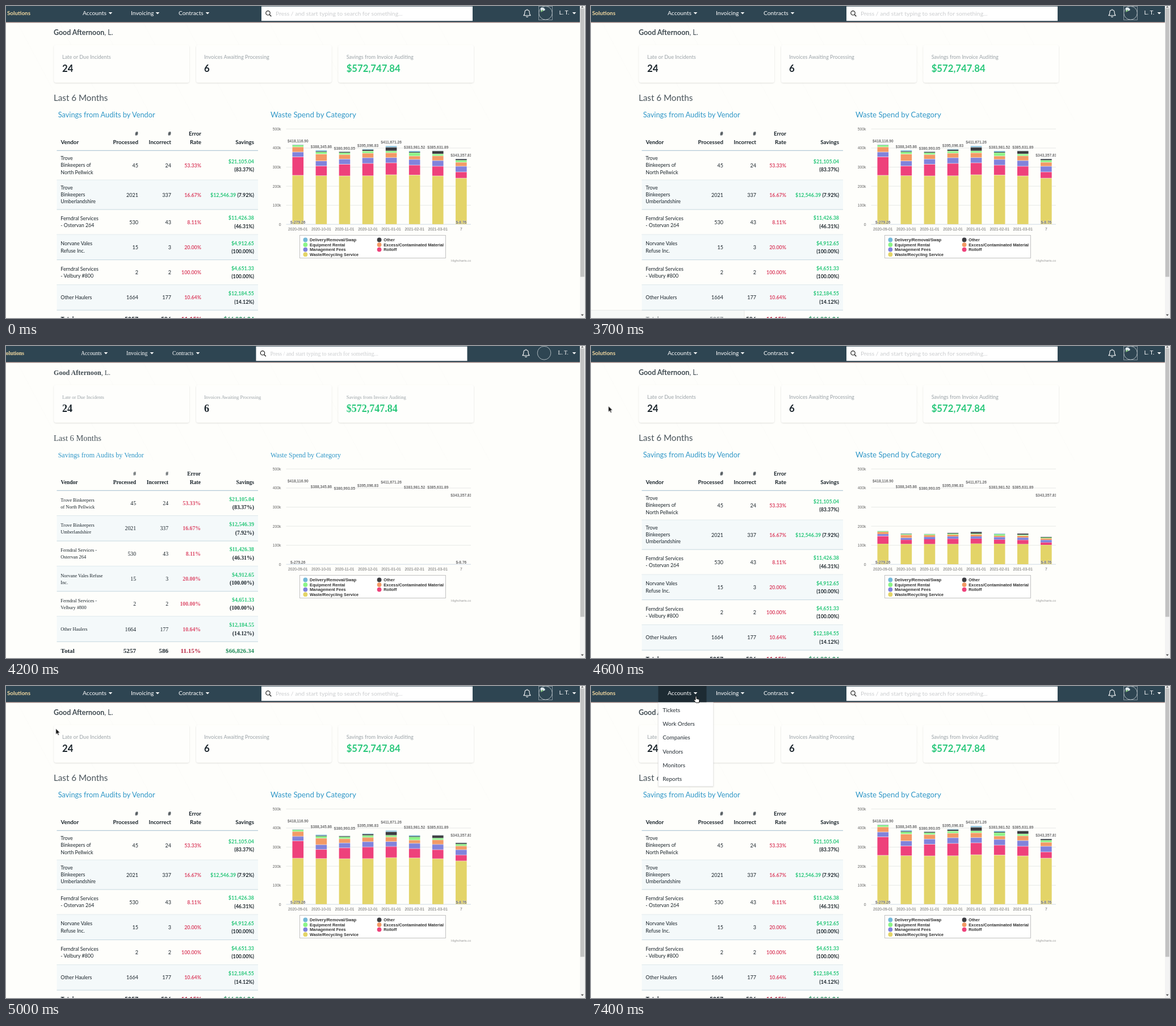
Recreate the animation shown at these times as an HTML page. Size 1020 px wide and 549 px high, loop 8000 ms.

```html
<!DOCTYPE html>
<html lang="en">
<head>
<meta charset="utf-8">
<title>Savings dashboard</title>
<style>
html, body { margin: 0; width: 100%; height: 100%; overflow: hidden; background: #fefefb; }
svg { display: block; width: 1020px; height: 549px; }
text { white-space: pre; }
.sans { font-family: Lato, sans-serif; }
.serif { font-family: "Liberation Serif", serif; }
.chart { font-family: "Liberation Sans", Arial, sans-serif; }
.frame, .sans, .serif, .status, .bars, .cursor, .arrow, .hand, .menu { animation: 8s step-end infinite; }
.frame { animation-name: reload; }
.sans { animation-name: loaded; }
.serif { animation-name: fallback; }
.status { animation-name: status; }
.bars { animation-name: grow; transform-origin: 0 384.2px; }
.cursor { animation-name: move; }
.arrow { animation-name: arrow; }
.hand { animation-name: hand; }
.menu { animation-name: menu; }
@keyframes reload { 0%, 52.5% { opacity: 1 } 48.75% { opacity: 0 } }
@keyframes loaded { 0%, 55% { opacity: 1 } 48.75% { opacity: 0 } }
@keyframes fallback { 0%, 55% { opacity: 0 } 52.5% { opacity: 1 } }
@keyframes status { 0%, 47.5% { opacity: 0 } 6.25% { opacity: 1 } 46.25% { opacity: .55 } }
@keyframes menu { 0% { opacity: 0 } 91.25% { opacity: .5 } 92.5%, 100% { opacity: 1 } }
@keyframes arrow { 0%, 71.25% { opacity: 0 } 56.25% { opacity: 1 } }
@keyframes hand { 0% { opacity: 0 } 71.25%, 100% { opacity: 1 } }
@keyframes grow {
  0%, 63.75% { transform: none }
  48.75% { transform: scaleY(.004) }
  55% { transform: scaleY(.147) }
  56.25% { transform: scaleY(.273) }
  57.5% { transform: scaleY(.419) }
  58.75% { transform: scaleY(.576) }
  60% { transform: scaleY(.725) }
  61.25% { transform: scaleY(.851) }
  62.5% { transform: scaleY(.941) }
}
@keyframes move {
  0% { transform: translate(12px, 116px) }
  57.5% { transform: translate(30.6px, 105.6px) }
  58.75% { transform: translate(45px, 99px) }
  60% { transform: translate(58px, 92px) }
  61.25% { transform: translate(72px, 85px) }
  62.5% { transform: translate(87.7px, 74.8px) }
  63.75% { transform: translate(116px, 47px) }
  68.75% { transform: translate(126px, 40px) }
  70% { transform: translate(143px, 31px) }
  71.25% { transform: translate(164px, 20px) }
  72.5% { transform: translate(179px, 14px) }
  73.75% { transform: translate(184px, 15px) }
  75%, 100% { transform: translate(185px, 18px) }
}
</style>
</head>
<body>
<svg id="stage" viewBox="0 0 1020 549"></svg>
<script>
const INK = '#1b252c', GREEN = '#28c77a', PINK = '#dc4867', BLUE = '#2f97c8', BAR = '#2e4552';

const esc = s => s.replace(/&/g, '&amp;').replace(/</g, '&lt;');
const text = (x, y, s, size, fill = INK, weight = 400, anchor = 'start') =>
  `<text x="${x}" y="${y}" font-size="${size}" fill="${fill}" font-weight="${weight}" text-anchor="${anchor}">${esc(s)}</text>`;
const rect = (x, y, w, h, fill, extra = '') =>
  `<rect x="${x}" y="${y}" width="${w}" height="${h}" fill="${fill}" ${extra}/>`;
const path = (d, fill = 'none', extra = '') => `<path d="${d}" fill="${fill}" ${extra}/>`;
const rule = (x1, x2, y, color, width = 1) => path(`M${x1} ${y}H${x2}`, 'none', `stroke="${color}" stroke-width="${width}"`);
const group = (cls, body) => `<g class="${cls}">${body}</g>`;
const caret = x => path(`M${x - 3.3} 11h6.6l-3.3 3.6z`, '#fff');

// vendor lines (web font), vendor lines (fallback), processed, incorrect, rate, savings, share
const rows = [
  ['Trove|Binkeepers of|North Pellwick', 'Trove Binkeepers|of North Pellwick', '45', '24', '53.33%', '$21,105.04', '(83.37%)'],
  ['Trove|Binkeepers|Umberlandshire', 'Trove Binkeepers|Umberlandshire', '2021', '337', '16.67%', '$12,546.39', '(7.92%)'],
  ['Ferndral Services|- Ostervan 264', 'Ferndral Services -|Ostervan 264', '530', '43', '8.11%', '$11,426.38', '(46.31%)'],
  ['Norvane Vales|Refuse Inc.', 'Norvane Vales Refuse|Inc.', '15', '3', '20.00%', '$4,912.65', '(100.00%)'],
  ['Ferndral Services|- Velbury #800', 'Ferndral Services -|Velbury #800', '2', '2', '100.00%', '$4,651.33', '(100.00%)'],
  ['Other Haulers', 'Other Haulers', '1664', '177', '10.64%', '$12,184.55', '(14.12%)']
];

const sans = {
  cls: 'sans', vendor: 0, nav: [135, 220, 304], carets: [184, 267, 355], search: 450, bell: 918, avatar: 950.5, user: 974.5,
  brand: [43, 9.9], navSize: 10.3, hint: 10.4, hello: 12.4, label: 9.15, figure: 16.7, period: 15.2, titles: [12.8, 13.3],
  head: 9.8, cols: [233, 291, 344], name: 8.9, num: 9, strong: 8.85, total: 10.5,
  edges: [254.5, 306.3, 358.1, 402.3, 446.6, 490.8, 535.2]
};
const serif = {
  cls: 'serif', vendor: 1, nav: [132, 212, 293], carets: [176, 257, 338], search: 440.5, bell: 916, avatar: 948, user: 972.5,
  brand: [32, 9.5], navSize: 9.75, hint: 9.75, hello: 12.1, label: 8.5, figure: 18, period: 14.5, titles: [12, 12],
  head: 9.6, cols: [229, 286, 343], name: 8.4, num: 9.75, strong: 9.75, total: 11.1,
  edges: [0, 1, 2, 3, 4, 5, 6].map(i => 254.5 + i * 44.3)
};

function header(f) {
  const s = f.search, b = f.bell, a = f.avatar;
  const icon = `stroke="#fff" stroke-width="1.1" stroke-linejoin="round"`;
  let out = text(f.brand[0], 16.3, 'Solutions', f.brand[1], '#f3d9a0', 700, 'end');
  ['Accounts', 'Invoicing', 'Contracts'].forEach((name, i) => out += text(f.nav[i], 15.6, name, f.navSize, '#fff') + caret(f.carets[i]));
  out += rect(s, .8, 372, 25.4, '#fff') +
    `<circle cx="${s + 11.5}" cy="12.3" r="3.7" fill="none" stroke="#222" stroke-width="1.2"/>` +
    path(`M${s + 14.3} 15.2l3 3`, 'none', 'stroke="#222" stroke-width="1.4"') +
    text(s + 25, 16.7, 'Press / and start typing to search for something...', f.hint, '#cbcdcf');
  out += path(`M${b - 6} 16.7c2-2 1.8-3.7 1.9-5.7c.2-5.3 8-5.3 8.2 0c.1 2 0 3.7 1.9 5.7zM${b} 7v-1.5M${b - 1.6} 18.2c.4 1.7 2.8 1.7 3.2 0`, 'none', icon);
  out += `<circle cx="${a}" cy="12.3" r="11.8" fill="none" stroke="#b9c3c8" stroke-width=".9"/>`;
  if (f === sans) out += rect(938.5, .5, 24, 24, 'none', 'stroke="#9eabb2" stroke-width=".8"') +
    path('M942 3h5l2.5 2.5v2l-7.5 3z', '#dfe9ef') + path('M942 9l3-2.5 2 1.5-5 3z', '#6fb56b');
  return out + text(f.user, 15.4, 'L. T.', f.navSize - .1, '#fff') + caret(1001);
}

function table(f) {
  const [p, n, r] = f.cols, right = 437;
  let out = '';
  [['#', 'Processed', p], ['#', 'Incorrect', n], ['Error', 'Rate', r], ['', 'Savings', right]].forEach(([a, b, x]) =>
    out += text(x, 228, a, f.head, INK, 700, 'end') + text(x, 242.5, b, f.head, INK, 700, 'end'));
  out += text(96.5, 242.5, 'Vendor', f.head, INK, 700);
  rows.forEach((row, i) => {
    const top = f.edges[i], bottom = f.edges[i + 1], mid = (top + bottom) / 2, lines = row[f.vendor].split('|');
    if (i % 2) out += rect(89.5, top, 354.5, bottom - top, '#f4f9fa');
    out += rule(89.5, 444, bottom, '#c5d7df');
    lines.forEach((s, k) => out += text(96.3, mid + 3 + (k - (lines.length - 1) / 2) * 12.1, s, f.name));
    out += text(p, mid + 3.4, row[2], f.num, INK, 400, 'end') + text(n, mid + 3.4, row[3], f.num, INK, 400, 'end') +
      text(r, mid + 3.4, row[4], f.strong, PINK, 700, 'end');
    if (f === sans && i === 1)
      out += `<text x="${right}" y="${mid + 3.4}" font-size="${f.strong}" font-weight="700" text-anchor="end" fill="${INK}"><tspan fill="${GREEN}">${row[5]}</tspan> ${row[6]}</text>`;
    else out += text(right, mid - 3.9, row[5], f.strong, GREEN, 700, 'end') + text(right, mid + 10.6, row[6], f.strong, INK, 700, 'end');
  });
  const y = f.edges[6] + 19.8;
  out += rule(89.5, 444, 254.3, '#b4c9d8', 1.3) + text(96.5, y, 'Total', f.total, INK, 700);
  [[p, '5257', INK], [n, '586', INK], [r, '11.15%', '#b7213f'], [right, '$66,826.34', '#1e8c58']].forEach(([x, s, c]) =>
    out += text(x, y, s, f.total, c, 700, 'end'));
  return out;
}

function page(f) {
  const gray = '#9ba3a8';
  return group(f.cls, header(f) +
    `<text x="84" y="50.5" font-size="${f.hello}" fill="#3e4950"><tspan font-weight="700">Good Afternoon</tspan>, L.</text>` +
    text(99, 93, 'Late or Due Incidents', f.label, gray) + text(99, 115.7, '24', f.figure, INK, 700) +
    text(349, 93, 'Invoices Awaiting Processing', f.label, gray) + text(349, 115.7, '6', f.figure, INK, 700) +
    text(599.7, 93, 'Savings from Invoice Auditing', f.label, gray) + text(599.7, 115.7, '$572,747.84', f.figure, GREEN, 700) +
    text(84, 166.7, 'Last 6 Months', f.period, '#49545b') +
    text(91.7, 196.2, 'Savings from Audits by Vendor', f.titles[0], BLUE) +
    text(466, 196.2, 'Waste Spend by Category', f.titles[1], BLUE) + table(f));
}

function backdrop() {
  let out = '';
  for (let x = 20; x < 820; x += 74) out += path(`M${x} 30l92 172`, 'none', 'stroke="#fbfbf8"');
  [84.5, 335, 585.5].forEach(x => out += rect(x, 68.5, 238.5, 66.3, '#fefefc', 'rx="4" filter="url(#soft)"'));
  out += rect(0, 0, 1011, 28.7, BAR) + rule(0, 1011, 29.1, '#c08d85', .9);
  out += rect(1011, 0, 9, 549, '#f3f3f3') + rect(1011.8, 4, 7, 472.5, '#c2c2c2') +
    path('M1012.8 3h5l-2.5-3z', '#777') + path('M1012.8 542.5h5l-2.5 3z', '#555');
  return out;
}

// segment tops of each stack, bottom to top, in pixels
const stacks = [
  [298, 265.5, 257, 248, 244.7, 244.4, 244],
  [298.7, 281.5, 272.7, 260.5, 256.7, 255.6, 254],
  [299, 278.5, 269.3, 261.5, 258, 256.7, 256.4],
  [298.8, 277, 267, 259, 255.2, 252.6, 251.8],
  [297, 276, 266.8, 258.3, 255, 248.5, 246.2],
  [297.5, 280, 270, 264, 258, 256.8, 255.2],
  [299, 282, 272, 263.7, 260.3, 255, 254.8],
  [303, 292, 282, 275, 271.2, 269.2, 269]
];
const colors = ['#e3d468', '#ee417b', '#8083dc', '#f39a65', '#8cf587', '#3c3c40', '#74b8d8'];
const totals = ['$418,116.90', '$388,345.86', '$380,993.05', '$395,096.83', '$411,671.26', '$383,981.52', '$385,631.89', '$343,357.81'];
const labelY = [239.8, 250.3, 252.5, 247.8, 242.4, 251.4, 251, 264.8];
const dates = ['2020-09-01', '2020-10-01', '2020-11-01', '2020-12-01', '2021-01-01', '2021-02-01', '2021-03-01', '7'];
const legend = [['Delivery/Removal/Swap', 6], ['Equipment Rental', 4], ['Management Fees', 2], ['Waste/Recycling Service', 0],
  ['Other', 5], ['Excess/Contaminated Material', 3], ['Rolloff', 1]];

function chart() {
  const center = i => 514.3 + i * 41.08;
  let out = '', bars = '', labels = '';
  for (let i = 0; i < 6; i++) {
    const y = 216.4 + i * 33.56;
    out += rule(493.5, 819, y, i < 5 ? '#e5e7e5' : '#cbd5e2', .9) + text(484.5, y + 2.5, i < 5 ? `${500 - i * 100}k` : '0', 6.75, '#666', 400, 'end');
  }
  stacks.forEach((tops, i) => {
    let base = 384.2;
    bars += rect(center(i) - 9.8, tops[6], 19.6, base - tops[6], '#fff');
    tops.forEach((top, k) => {
      const gap = base - top > 2 ? .6 : 0;
      bars += rect(center(i) - 9.8, top + gap / 2, 19.6, base - top - gap, colors[k]);
      base = top;
    });
    labels += text(center(i), labelY[i], totals[i], 6.7, '#6e6e6e', 700, 'middle');
    out += text(center(i), 395.4, dates[i], 6.75, '#666', 400, 'middle');
  });
  labels += text(center(0), 383, '$-279.26', 6.7, '#6e6e6e', 700, 'middle') + text(center(7), 383, '$-8.76', 6.7, '#6e6e6e', 700, 'middle');
  out += group('bars', bars) + `<g paint-order="stroke" stroke="#fff" stroke-opacity=".6" stroke-width="1">${labels}</g>`;
  out += rect(517.5, 403.5, 257, 40, '#fff', 'stroke="#bcbcbc" stroke-width=".9"');
  legend.forEach(([name, c], i) => {
    const x = i < 4 ? 527.4 : 657.6, y = 411.5 + i % 4 * 8.55;
    out += `<circle cx="${x}" cy="${y}" r="3.9" fill="${colors[c]}"/>` + text(x + 7.6, y + 2.7, name, 7.33, '#303030', 700);
  });
  out += text(784, 450.2, 'Highcharts.com', 5.8, '#999');
  return `<g class="chart" clip-path="url(#plot)">${out}</g>`;
}

function menu() {
  const items = ['Tickets', 'Work Orders', 'Companies', 'Vendors', 'Monitors', 'Reports'];
  return group('menu', rect(118.5, 29, 97, 147.5, '#fff', 'filter="url(#soft)" stroke="#dedede" stroke-width=".6"') +
    `<g font-family="Lato, sans-serif">${items.map((s, i) => text(126.3, 45.8 + i * 24.25, s, 9.95, '#242d34')).join('')}</g>`);
}

const cursor = group('cursor',
  group('arrow', path('M0 0V10.5l2.4-2.2 1.6 3.7 1.8-.8-1.6-3.6h3.3z', '#111', 'stroke="#fff" stroke-width=".7"')) +
  group('hand', path('M-1 1c0-1.5 2-1.5 2 0v3.5l4 .9q1 .3 .9 1.5l-.6 4.6h-5.5l-3-4c-.8-1.2 .6-2 1.5-1.2l.7 .7z', '#fff', 'stroke="#111" stroke-width=".9" stroke-linejoin="round"')));

document.getElementById('stage').innerHTML =
  `<defs><clipPath id="plot"><path d="M460 205H819V455H460z"/></clipPath>
   <filter id="soft" x="-5%" y="-10%" width="110%" height="125%"><feDropShadow dx="0" dy="1" stdDeviation=".9" flood-color="#000" flood-opacity=".14"/></filter></defs>` +
  group('frame', backdrop() + chart()) +
  group('menu', rect(118.5, 0, 85, 28.7, '#1d2b33')) +
  page(sans) + page(serif) +
  group('status', rect(-1, 535.3, 271, 15, '#f3f5f4', 'stroke="#cfd1d0" stroke-width=".8"')) +
  menu() + cursor;
</script>
</body>
</html>
```
